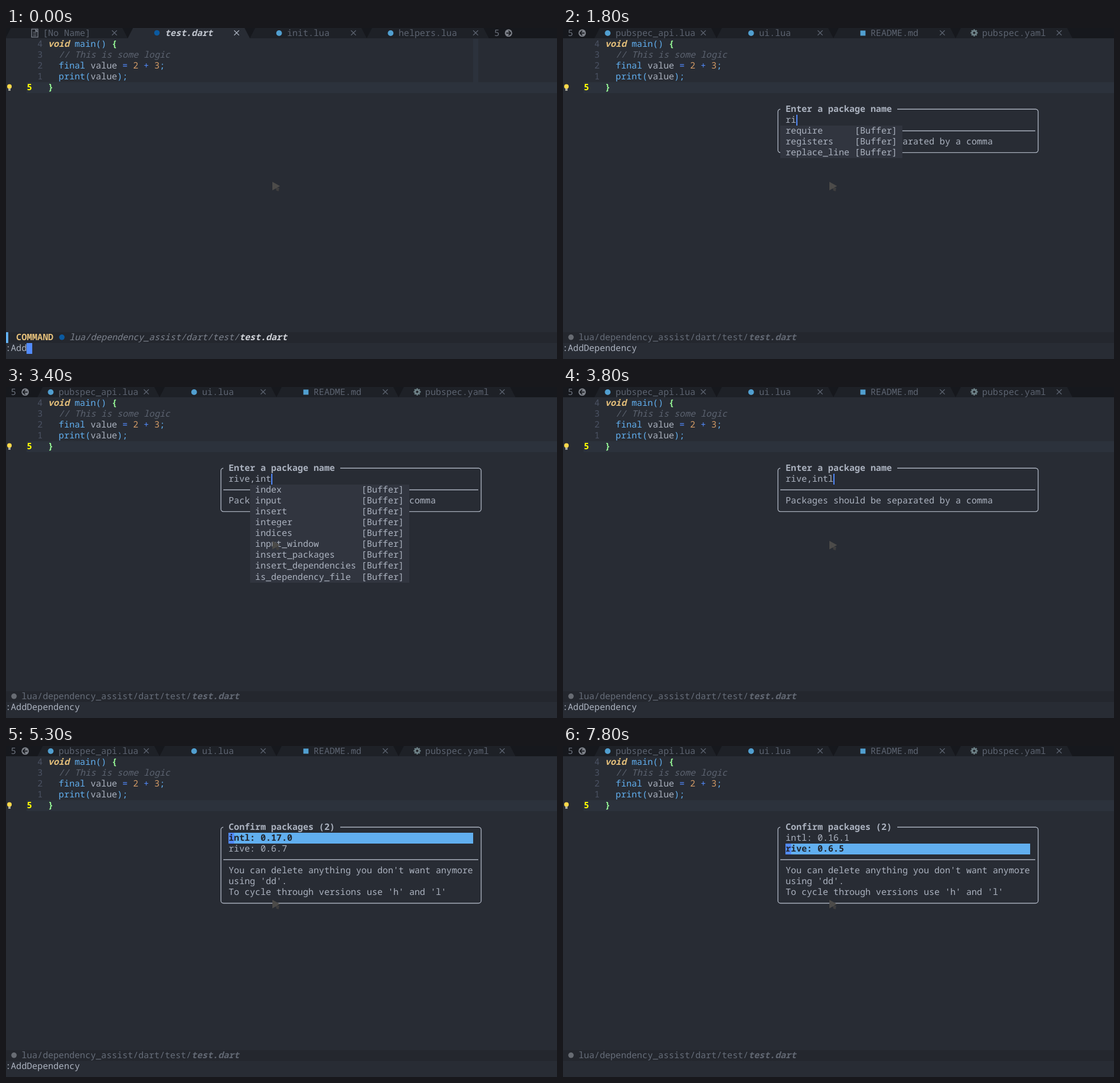
Animation, 966 px wide and 580 px high, one loop 8000 ms. Source, as an HTML page with a canvas:

```html
<!DOCTYPE html>
<html lang="en">
<head>
<meta charset="utf-8">
<title>Adding packages in the editor</title>
<style>
html, body { margin: 0; width: 100%; height: 100%; overflow: hidden; background: #282c34; }
canvas { display: block; }
</style>
</head>
<body>
<canvas id="screen" width="966" height="580"></canvas>
<script>
const ctx = document.getElementById('screen').getContext('2d');
const LOOP = 8000;
const BG = '#282c34', FILL = '#16181d', TAB = '#1e2127', MENU = '#31353f', BAR = '#24272e', ROW = '#2c323c';
const FG = '#abb2bf', DIM = '#5c6370', BLUE = '#61afef', CURSOR = '#528bff', YELLOW = '#e5c07b', ORANGE = '#d19a66';
const BRACE = '#98fb98', LUA = '#519fd0', DART = '#0b5aa0';

const bufferWords = ['require', 'registers', 'replace_line'];
const packageWords = ['index', 'input', 'insert', 'integer', 'indices', 'input_window', 'insert_packages',
  'insert_dependencies', 'is_dependency_file', 'filter', 'title'];
const versions = [[0, '0.17.0'], [6200, '0.17.0-nullsafety.2'], [6400, '0.17.0-nullsafety.1'],
  [6600, '0.17.0-nullsafety'], [6800, '0.16.1']];
const riveVersions = [[0, '0.6.7'], [7500, '0.6.6+1'], [7800, '0.6.5']];
const typed = [[0, ''], [1700, 'r'], [1800, 'ri'], [1900, 'riv'], [2300, 'rive'], [2600, 'rive,'],
  [3000, 'rive,i'], [3200, 'rive,in'], [3400, 'rive,int'], [3800, 'rive,intl']];
const queries = [[0, ''], [3000, 'i'], [3400, 'in'], [3500, 'int'], [3800, '']];

const colX = col => col * 9.312 - .8;
const rowY = row => row * 19.03;
const midY = row => rowY(row + .5) - .5;
const at = (steps, t) => steps.filter(s => s[0] <= t).pop()[1];
const fuzzy = (words, query) => words.filter(w => new RegExp([...query].join('.*')).test(w));

function rect(x, y, w, h, color) {
  ctx.fillStyle = color;
  ctx.fillRect(x, y, w, h);
}

// Fill cells of the character grid, snapped to whole pixels.
function cells(row, col, cols, color, rows = 1) {
  const x = Math.round(colX(col)), y = Math.round(rowY(row));
  rect(x, y, Math.round(colX(col + cols)) - x, Math.round(rowY(row + rows)) - y, color);
}

function text(row, col, str, color = FG, style = '') {
  ctx.font = `${style} 15.5px "Noto Sans Mono", "DejaVu Sans Mono", monospace`;
  ctx.fillStyle = color;
  [...str].forEach((ch, i) => ctx.fillText(ch, colX(col + i), Math.round(rowY(row) + 14)));
}

// Consecutive runs of [text, color, style] on one row.
function runs(row, col, parts) {
  for (const [str, color, style] of parts) {
    text(row, col, str, color, style);
    col += str.length;
  }
}

function poly(color, ...points) {
  ctx.fillStyle = color;
  ctx.beginPath();
  points.forEach(p => ctx.lineTo(...p));
  ctx.fill();
}

function dot(x, y, r, color) {
  ctx.fillStyle = color;
  ctx.beginPath();
  ctx.arc(x, y, r, 0, 7);
  ctx.fill();
}

// Separate segments, two points each.
function line(color, width, ...points) {
  ctx.strokeStyle = color;
  ctx.lineWidth = width;
  ctx.beginPath();
  points.forEach((p, i) => i % 2 ? ctx.lineTo(...p) : ctx.moveTo(...p));
  ctx.stroke();
}

const icons = {
  file(x, y) {
    ctx.strokeStyle = '#7d838e';
    ctx.lineWidth = 1.3;
    ctx.strokeRect(x - 5.5, y - 6.5, 11, 14);
    line('#7d838e', 1.2, [x - 3, y - 1], [x + 3, y - 1], [x - 3, y + 2], [x + 3, y + 2], [x - 3, y + 5], [x + 3, y + 5]);
    poly('#7d838e', [x + 1, y - 7], [x + 6, y - 2], [x + 1, y - 2]);
  },
  dart: (x, y) => dot(x, y, 4.8, DART),
  lua: (x, y) => dot(x, y + .5, 5, LUA),
  markdown: (x, y) => rect(x - 4, y - 4, 9, 9, LUA),
  gear(x, y) {
    for (let i = 0; i < 4; i++) {
      const a = i * Math.PI / 4, c = Math.cos(a) * 6.3, s = Math.sin(a) * 6.3;
      line('#6d8086', 2.6, [x - c, y - s], [x + c, y + s]);
    }
    dot(x, y, 4.8, '#6d8086');
    dot(x, y, 2, TAB);
  }
};

function tab(start, end, icon, iconCol, name, active) {
  const a = colX(start), b = colX(end), slant = 9.3;
  poly(active ? BG : TAB, [a + slant, 0], [b - slant, 0], [b, 18], [a, 18]);
  icons[icon](colX(iconCol + .5), 8.5);
  text(0, iconCol + 2, name, active ? '#c3c8d1' : DIM, active ? 'italic bold' : '');
  const x = colX(end - 2.5), y = 8.5, r = 4.3;
  line(active ? FG : DIM, 1.3, [x - r, y - r], [x + r, y + r], [x - r, y + r], [x + r, y - r]);
}

function more(col, dir) {
  text(0, col, '5', '#6b717c');
  const x = colX(col + 2.7), y = 8.8;
  dot(x, y, 6.5, '#7b7f87');
  line(FILL, 1.8, [x - 4, y], [x + 4, y], [x + dir * 4, y], [x, y - 4], [x + dir * 4, y], [x, y + 4]);
}

function tabs(inPopup) {
  rect(0, 0, 966, 18, FILL);
  if (inPopup) {
    more(1, -1);
    tab(6, 29, 'lua', 8, 'pubspec_api.lua');
    tab(29, 51, 'lua', 35, 'ui.lua');
    tab(51, 74, 'markdown', 56, 'README.md');
    tab(74, 96, 'gear', 77, 'pubspec.yaml');
  } else {
    tab(0, 23, 'file', 5, '[No Name]');
    tab(23, 46, 'dart', 28, 'test.dart', true);
    tab(46, 68, 'lua', 51, 'init.lua');
    tab(68, 91, 'lua', 72, 'helpers.lua');
    more(92, 1);
  }
}

function code() {
  for (let i = 1; i < 5; i++) text(i, 6, String(5 - i), '#4b5263');
  runs(1, 8, [['void', YELLOW, 'italic bold'], [' main() ', BLUE], ['{', BRACE, 'bold']]);
  text(2, 10, '// This is some logic', DIM, 'italic');
  runs(3, 10, [['final', BLUE], [' value ', FG], ['= ', CURSOR], ['2', ORANGE], [' + ', CURSOR], ['3', ORANGE], [';', BLUE]]);
  runs(4, 10, [['print(', BLUE], ['value', FG], [');', BLUE]]);
  cells(5, 4, 100, ROW);
  text(5, 4, '5', '#ffff00', 'bold');
  text(5, 8, '}', BRACE, 'bold');
  dot(6, 102.5, 4, '#ffd84a');
  rect(4, 106, 4, 4, '#a9a9a0');
}

function statusLine(inPopup) {
  cells(28, 0, 104, BAR);
  const y = midY(28);
  if (inPopup) {
    dot(14, y, 4.8, '#686c73');
  } else {
    rect(0, 533, 4, 19, BLUE);
    text(28, 2, 'COMMAND', YELLOW, 'bold');
    dot(98, y, 4.8, DART);
  }
  runs(28, inPopup ? 3 : 12, [
    ['lua/dependency_assist/dart/test/', inPopup ? '#666d79' : '#7d838e', inPopup ? '' : 'italic'],
    ['test.dart', inPopup ? '#626873' : '#d0d3d9', 'italic bold']]);
}

function frame(lastRow, title) {
  const left = 376.8, right = 833, top = midY(7);
  ctx.strokeStyle = FG;
  ctx.lineWidth = 1.4;
  ctx.beginPath();
  ctx.roundRect(left, top, right - left, midY(lastRow) - top, 4.5);
  ctx.stroke();
  if (title) {
    cells(7, 41, 22, BG);
    text(7, 42, title, FG, 'bold');
  }
}

function divider(row) {
  line(FG, 1.4, [colX(41), midY(row)], [colX(89), midY(row)]);
}

function menu(col, words) {
  const width = Math.max(...words.map(w => w.length));
  cells(9, col, width + 11, MENU, words.length);
  words.forEach((w, i) => text(9 + i, col + 1, w.padEnd(width + 1) + '[Buffer]'));
}

function prompt(t) {
  const input = at(typed, t), query = at(queries, t);
  frame(11, 'Enter a package name');
  divider(9);
  text(8, 42, input);
  text(10, 42, 'Packages should be separated by a comma');
  if (t >= 1800 && t < 2000) menu(41, fuzzy(bufferWords, 'r'));
  if (query) menu(46, fuzzy(packageWords, query));
  rect(Math.round(colX(42 + input.length)), 152, 2, 19, CURSOR);
}

function confirmation(t) {
  frame(14, 'Confirm packages (2)');
  divider(10);
  const selected = t < 7400 ? 0 : 1;
  ['intl: ' + at(versions, t), 'rive: ' + at(riveVersions, t)].forEach((label, i) => {
    const on = i === selected;
    if (on) {
      cells(8 + i, 42, 46, BLUE);
      cells(8 + i, 42, 1, CURSOR);
    }
    text(8 + i, 42, label, on ? '#22262e' : FG, on ? 'bold' : '');
  });
  text(11, 42, "You can delete anything you don't want anymore");
  text(12, 42, "using 'dd'.");
  text(13, 42, "To cycle through versions use 'h' and 'l'");
}

function commandLine(t) {
  if (t >= 6100) return;
  const command = t < 300 ? ':Add' : ':AddDependency';
  text(29, 0, command);
  if (t < 1100) cells(29, command.length, 1, CURSOR);
  if (t >= 300 && t < 1000) {
    cells(27, 0, 18, BLUE);
    cells(28, 0, 18, MENU);
    text(27, 1, 'AddDependency', '#22262e', 'bold');
    text(28, 1, 'AddDevDependency');
  }
}

function draw(t) {
  const inPopup = t >= 1100;
  rect(0, 0, 966, 580, BG);
  if (!inPopup) cells(1, 88, 1, ROW, 4);
  tabs(inPopup);
  code();
  statusLine(inPopup);
  commandLine(t);
  if (inPopup && t < 4000) prompt(t);
  else if (t >= 4000 && t < 5100) {
    frame(9);
    text(8, 42, t < 4600 ? 'loading..' : 'loading...');
  } else if (t >= 5300) confirmation(t);
  // Mouse pointer
  poly('#3e3e3e', [473, 280], [479, 280], [478, 286], [474, 285]);
  poly('#4c4b49', [467, 269.5], [480.5, 277], [467, 284.5]);
}

ctx.textRendering = 'geometricPrecision';
const began = performance.now();
function tick() {
  draw((performance.now() - began) % LOOP);
  requestAnimationFrame(tick);
}
tick();
</script>
</body>
</html>
```
